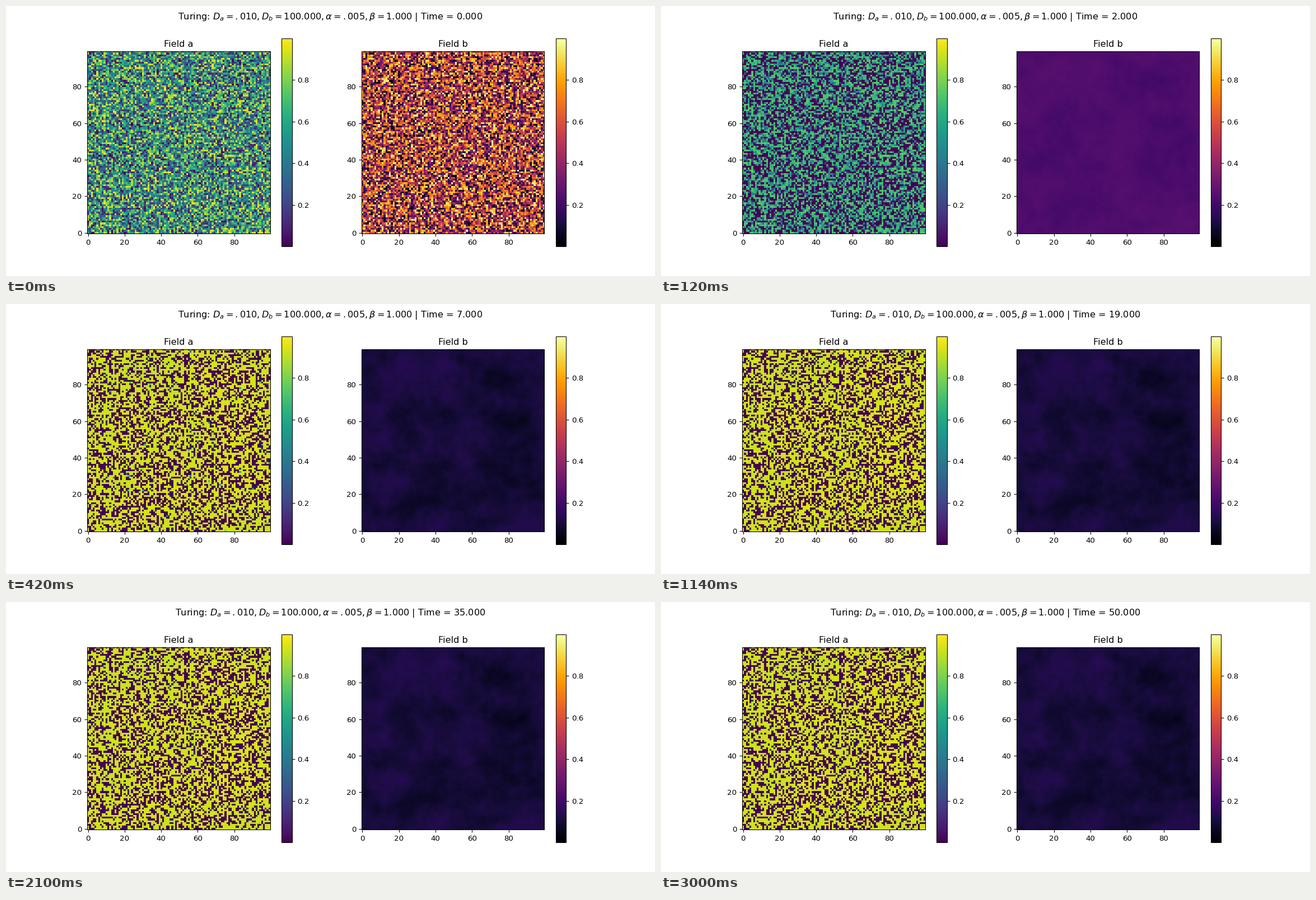
Write a matplotlib script that moves like this. It is 1159x483 px and loops after 3.06 s.

```python
import matplotlib.pyplot as plt
import numpy as np
from matplotlib.animation import FuncAnimation

N = 100
FRAMES, INTERVAL = 51, 60
D_A, D_B, ALPHA, BETA = 0.010, 100.0, 0.005, 1.0
STEPS = 50  # solver steps per unit of time
DT = 1 / STEPS

# Places (x, y) where field a starts slightly richer or poorer
RICH = [(43, 78), (10, 70), (60, 55), (12, 25), (60, 18), (92, 7), (70, 97), (97, 68), (25, 92)]
POOR = [(15, 37), (70, 35), (92, 57), (25, 5), (25, 58), (56, 81), (79, 86)]
BIAS, RADIUS = 0.06, 5

wave_y = 2 * np.pi * np.fft.fftfreq(N)[:, None]
wave_x = 2 * np.pi * np.fft.rfftfreq(N)[None, :]
STIFFNESS = 4 - 2 * np.cos(wave_x) - 2 * np.cos(wave_y)


def bump(x, y):
    rows, cols = np.mgrid[:N, :N]
    dx = (cols - x + N / 2) % N - N / 2
    dy = (rows - y + N / 2) % N - N / 2
    return np.exp(-(dx**2 + dy**2) / (2 * RADIUS**2))


def fine_noise(rng):
    """Uniform noise without its broad patches."""
    noise = rng.random((N, N))
    patches = np.fft.rfft2(noise - 0.5) * np.exp(-STIFFNESS * 4**2 / 2)
    return noise - np.fft.irfft2(patches, s=(N, N))


def initial_fields():
    rng = np.random.default_rng(0)
    a, b = fine_noise(rng), fine_noise(rng)
    a += BIAS * (sum(bump(*p) for p in RICH) - sum(bump(*p) for p in POOR))
    return np.clip(a, 0.001, 0.999), np.clip(b, 0.001, 0.999)


def laplacian(f):
    return sum(np.roll(f, s, axis) for s in (-1, 1) for axis in (0, 1)) - 4 * f


def simulate():
    """Euler steps for a, exact exponential steps for the stiff field b."""
    a, b = initial_fields()
    rate = BETA + D_B * STIFFNESS
    decay = np.exp(-rate * DT)
    gain = BETA * (1 - decay) / rate
    history = [(a, b)]
    for _ in range(FRAMES - 1):
        for _ in range(STEPS):
            b_hat = decay * np.fft.rfft2(b) + gain * np.fft.rfft2(a)
            a = a + DT * (D_A * laplacian(a) + a - a**3 - b + ALPHA)
            b = np.fft.irfft2(b_hat, s=(N, N))
        history.append((a, b))
    return history


def heading(time):
    return (rf"Turing: $D_a = .010, D_b = 100.000, \alpha = .005, \beta = 1.000$"
            f" | Time = {time:.3f}")


history = simulate()
plt.rcParams["font.family"] = "DejaVu Sans"
DPI = 96.6
# The small excess keeps the pixel size from being rounded down
fig, axes = plt.subplots(1, 2, figsize=(1159.001 / DPI, 483.001 / DPI), dpi=DPI)
title = fig.suptitle(heading(0))

images = []
for ax, name, cmap, field in zip(axes, "ab", ("viridis", "inferno"), history[0]):
    image = ax.imshow(field, cmap=cmap, origin="lower")
    ax.set_title(f"Field {name}")
    fig.colorbar(image, ax=ax)
    images.append(image)


def update(frame):
    title.set_text(heading(frame))
    for image, field in zip(images, history[frame]):
        image.set_data(field)
    return [title, *images]


anim = FuncAnimation(fig, update, frames=FRAMES, interval=INTERVAL, repeat=True, repeat_delay=0)
plt.show()
```
